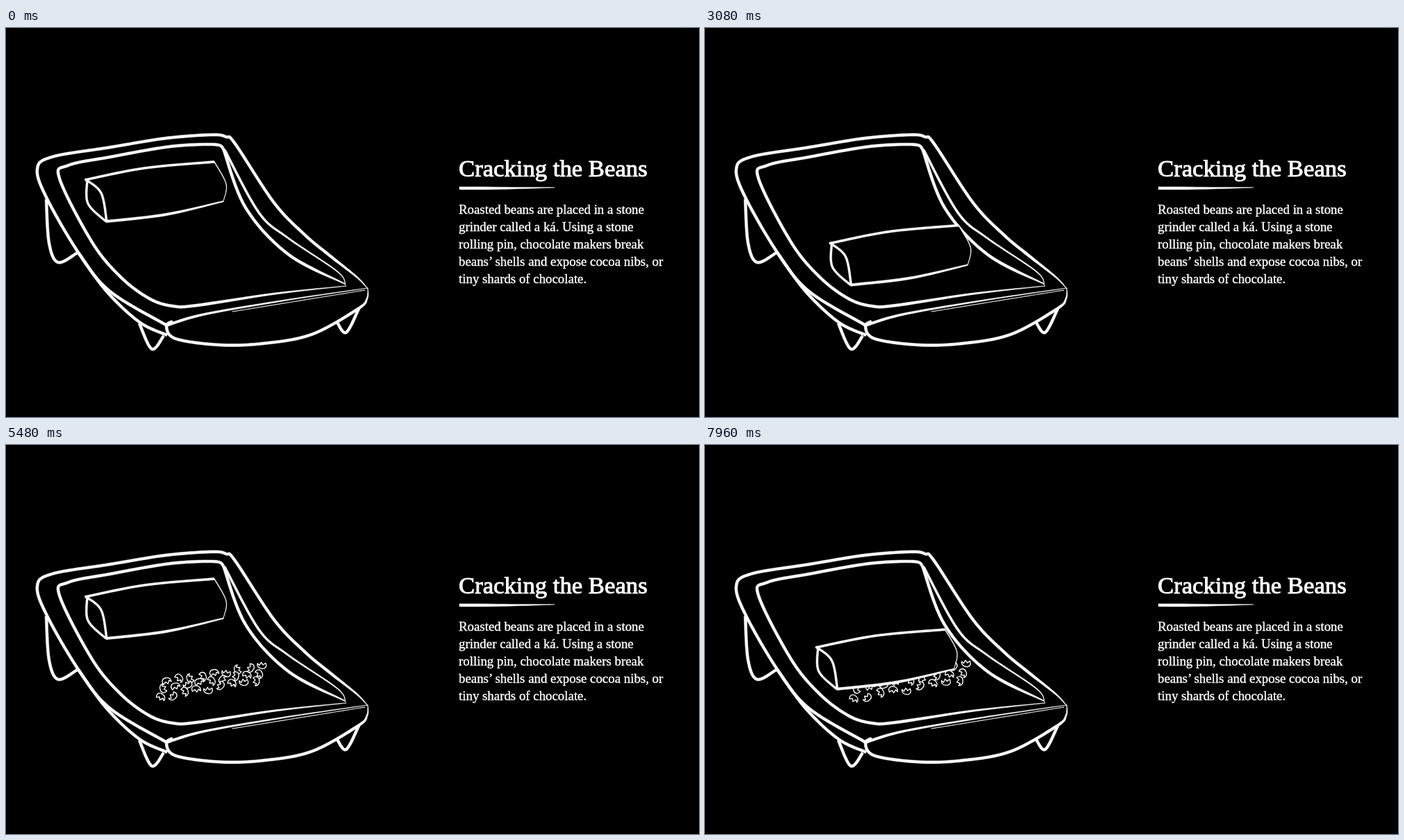
These frames come from a looping animation (998 by 561 pixels, 8 s). An HTML page:

```html
<!DOCTYPE html>
<html lang="en">
<head>
<meta charset="utf-8">
<title>Cracking the Beans</title>
<style>
  html, body { margin: 0; height: 100%; overflow: hidden; background: #000; }
  svg { display: block; width: 100vw; height: 100vh; }
  .brush { fill: #fff; stroke: #fff; stroke-width: .5; stroke-linejoin: round; }
  #beans, #shards { stroke: #fff; stroke-width: 1.8; }
  #shards { stroke-width: 1.5; stroke-linejoin: round; }
  text { fill: #fff; stroke: #fff; font-family: "Liberation Serif", "Times New Roman", serif; }
  .title { font-size: 34.7px; stroke-width: 1px; }
  .body { font-size: 18.85px; stroke-width: .4px; }
</style>
</head>
<body>
<svg viewBox="0 0 998 561">
  <g id="base"></g>
  <text class="title" x="652" y="213.5">Cracking the Beans</text>
  <g class="body">
    <text x="652" y="268">Roasted beans are placed in a stone</text>
    <text x="652" y="293">grinder called a ká. Using a stone</text>
    <text x="652" y="318">rolling pin, chocolate makers break</text>
    <text x="652" y="343">beans’ shells and expose cocoa nibs, or</text>
    <text x="652" y="368">tiny shards of chocolate.</text>
  </g>
  <g id="stage">
    <g id="shards"></g>
    <g id="beans"></g>
    <g id="pin"><path d="M114 218L200 202L300 193L317 225L313 250L230 269L144 279L118 253Z"/></g>
  </g>
</svg>
<script>
const LOOP = 8000;
const [base, stage, beans, shards, pin] =
  ['base', 'stage', 'beans', 'shards', 'pin'].map(id => document.getElementById(id));
const make = (tag, attrs, parent) => {
  const el = document.createElementNS('http://www.w3.org/2000/svg', tag);
  for (const k in attrs) el.setAttribute(k, attrs[k]);
  if (parent) parent.append(el);
  return el;
};
const ease = v => (v = Math.min(1, Math.max(0, v)), v * v * (3 - 2 * v));
const move = (el, x, y) => el.setAttribute('transform', `translate(${x} ${y})`);
const random = n => Math.abs(Math.sin(n * 12.9898) * 43758.5453) % 1;

// point on a smooth curve through all key points
function spline(pts, u) {
  const i = Math.min(pts.length - 2, Math.floor(u)), v = u - i, b = pts[i], c = pts[i + 1];
  const a = pts[i - 1] || b, d = pts[i + 2] || c;
  return [0, 1].map(k => b[k] + v / 2 * (c[k] - a[k] +
    v * (2 * a[k] - 5 * b[k] + 4 * c[k] - d[k] + v * (3 * (b[k] - c[k]) + d[k] - a[k]))));
}

// brush line of width w0 that narrows to w1 after the part `from`
function brush(parent, keys, w0 = 4.4, w1 = w0, from = .8) {
  const pts = keys.split(' ').map(p => p.split(',').map(Number));
  const n = (pts.length - 1) * 12, left = [], right = [];
  for (let i = 0; i <= n; i++) {
    const at = j => spline(pts, Math.min(n, Math.max(0, j)) / 12);
    const [x, y] = at(i), [x0, y0] = at(i - .2), [x1, y1] = at(i + .2);
    const taper = Math.max(0, (i / n - from) / (1 - from));
    const r = (w0 + (w1 - w0) * taper - .5) / 2 / Math.hypot(x1 - x0, y1 - y0);
    const dx = (y0 - y1) * r, dy = (x1 - x0) * r;
    left.push([x + dx, y + dy]);
    right.unshift([x - dx, y - dy]);
  }
  make('polygon', { class: 'brush', points: left.concat(right).join(' ') }, parent);
}

// rims
brush(base, '230,428 150,380 105,325 59,246 45,204 66,186 150,172 230,159 296,154 317,157 330,167 386,252 430,298 466,328 505,359 521,376', 4.4, .8, .87);
brush(base, '104,324 145,380 192,424 232,443');
brush(base, '313,174 300,168 236,171 150,186 90,198 77,217 124,309 165,359 206,390 240,401 275,400 388,383 490,372', 4.4, .8, .85);
brush(base, '313,174 345,259 406,326 488,369', 4.4, 1.5);
brush(base, '315,176 364,266 405,302 477,351 489,371', 3.6, .8, .3);
// front
brush(base, '231,429 285,413 400,393 521,375', 4, .8, .2);
brush(base, '326,409 400,397 517,378', .9);
brush(base, '240,423 231,430 244,448 307,457 370,455 440,442 507,405 520,390 521,375', 4.4, .8, .74);
// legs
brush(base, '58,247 62,310 75,338 103,324');
brush(base, '192,426 210,463 227,444');
brush(base, '477,425 490,439 508,405');
// title rule
brush(base, '653,231 720,231 790,230', 4.4, .6, .3);
// pin
brush(pin, '114,219 200,202 300,193', 3.6);
brush(pin, '144,279 230,269 313,250', 4, 2, .5);
brush(pin, '114,218 137,238 145,279', 3.4);
brush(pin, '117,219 118,253 144,279', 3.4);
brush(pin, '300,193 317,225 313,250', 1.6, 1, 0);

// two heaps, the outer beans landing first and the middle ones on top
const COUNT = 18;
const pile = Array.from({ length: COUNT }, (_, i) => {
  const k = i / (COUNT - 1), heap = i % 2, turn = (i >> 1) * 2.4 + 3, r = Math.sqrt(1 - k);
  const x = 259 + 55 * heap + 24 * r * Math.cos(turn);
  const y = 342 - 11 * heap + 15 * r * Math.sin(turn);
  const g = make('g', {}, beans);
  make('ellipse', { cx: x, cy: y, rx: 8 + 3 * k, ry: 5 + 2 * k,
    transform: `rotate(${random(i + 1) * 180} ${x} ${y})` }, g);
  return { g, from: -y - 12, start: 180 + 240 * k, time: 800 + 400 * k };
});

// rows of broken halves lying along the pin
const bits = Array.from({ length: 27 }, (_, i) => {
  const row = 2 - Math.floor(i / 9), col = i % 9, g = make('g', {}, shards);
  make('path', { d: 'M-7 -2L-4 1L-1 -4L2 0L6 -3C9 3 5 7 0 6C-5 6 -8 2 -7 -2Z',
    transform: `rotate(${random(i + 5) * 360}) scale(.9)` }, g);
  return { g, x: 214 + 19 * col + 5 * row, y: 363 - 3.2 * col - 12 * row + 5 * random(i + 40) };
});

// the pin rolls along this curve; `up` is where it turns back
const track = make('path', { d: 'M0 0C22 30 46 105 103 103' });
const len = track.getTotalLength(), up = 86 / len;
const rolls = [
  [2000, 0], [2800, 1], [3300, up], [3800, 1], [4300, up], [4780, 1],
  [5480, 0], [6370, 1], [6980, up], [7480, 1], [7980, up]
];
function rollAt(t) {
  const i = rolls.findIndex(r => r[0] > t);
  if (i < 1) return i ? up : 0;
  const [t0, a] = rolls[i - 1], [t1, b] = rolls[i];
  return a + (b - a) * ease((t - t0) / (t1 - t0));
}

// moments when the pin hides the heap and the pieces spread further
const crushes = [2570, 3540, 4520, 6680, 7240];

function draw(now) {
  const t = now % LOOP;
  const p = track.getPointAtLength(len * rollAt(t));
  move(pin, p.x, p.y);

  // beans drop in front of the pin, then it rolls over them
  const top = t < 2000 ? beans : pin;
  if (stage.lastElementChild !== top) stage.append(top);
  const crushed = crushes.filter(c => c <= t).length;
  beans.style.display = crushed || t < 200 ? 'none' : '';
  shards.style.display = crushed ? '' : 'none';

  for (const b of pile) move(b.g, 0, b.from * (1 - ease((t - b.start) / b.time)));
  const spread = .75 + .05 * crushed;
  for (const s of bits) move(s.g, 300 + (s.x - 300) * spread, 343 + (s.y - 343) * spread);
  requestAnimationFrame(draw);
}
draw(performance.now());
</script>
</body>
</html>
```
